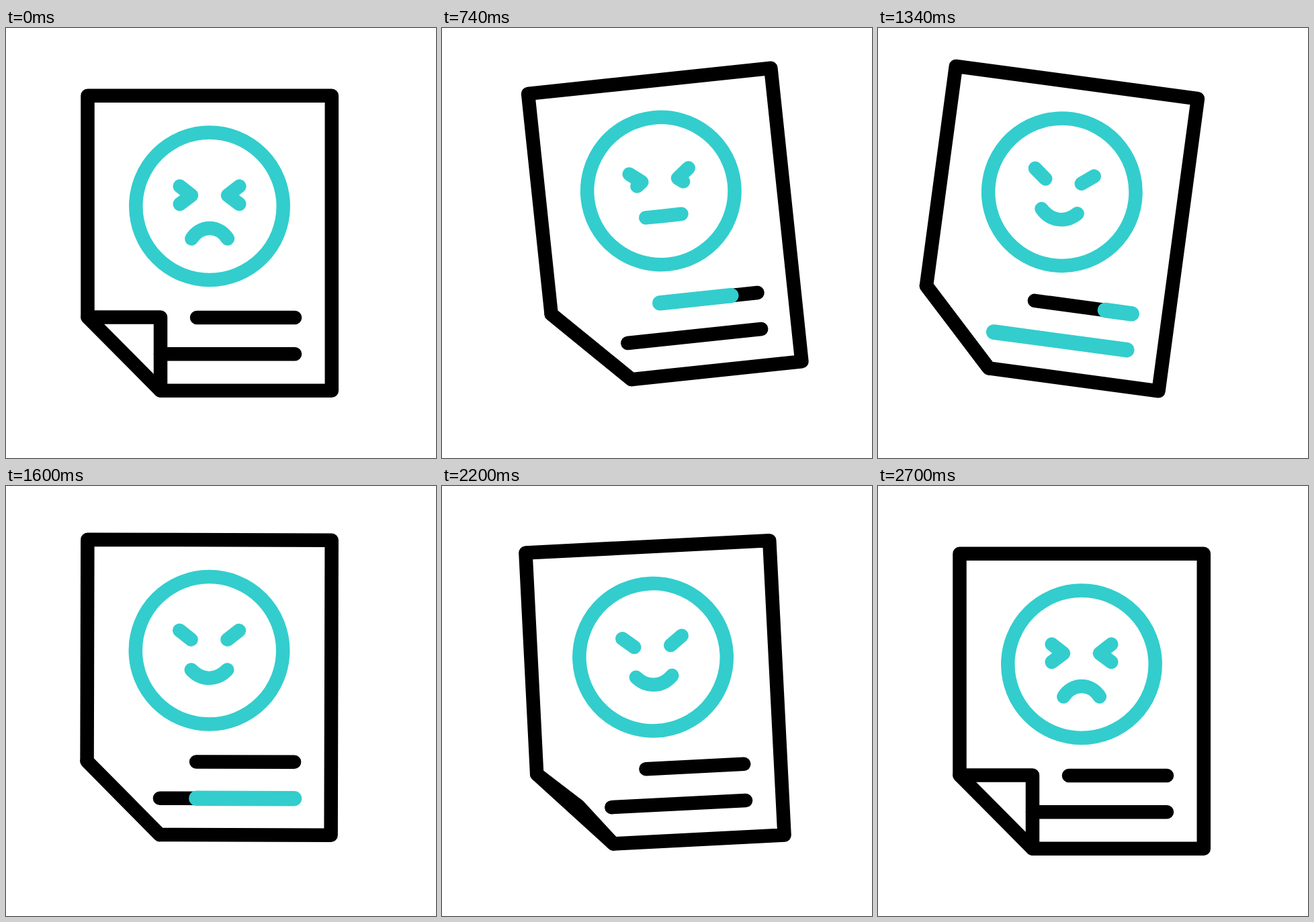
These frames come from a looping animation (640 px wide and 640 px high, 3.02 s). An HTML page:

```html
<!DOCTYPE html>
<html lang="en">
<head>
<meta charset="utf-8">
<title>Swinging page</title>
<style>
  html, body { margin: 0; width: 100%; height: 100%; overflow: hidden; background: #fff; }
  svg { display: block; width: 100%; height: 100%; }
  path, circle { fill: none; stroke: #000; stroke-width: 20.5; stroke-linecap: round; stroke-linejoin: round; }
  .teal > * { stroke: #33cdcd; }
  .sweep > * { stroke-width: 22.5; }
</style>
</head>
<body>
<svg viewBox="0 0 640 640">
  <g id="page">
    <path d="M284 431H430M230 485.3H430"/>
    <g class="teal sweep"><path id="sweep1"/><path id="sweep2"/></g>
    <path d="M121.5 430.5V100.7H484.8V539.7H230Z"/>
    <path id="flap"/>
    <g class="teal">
      <circle cx="303" cy="265.3" r="109.7"/>
      <path id="eyes"/>
      <path id="mouth"/>
    </g>
  </g>
</svg>
<script>
const LOOP = 3020, STEP = 20;
const $ = id => document.getElementById(id);
const mix = (a, b, k) => a + (b - a) * k;

// Smooth 0..1 ramp between two times
function ramp(t, from, to) {
  const k = Math.min(1, Math.max(0, (t - from) / (to - from)));
  return k * k * (3 - 2 * k);
}

function sweep(id, x1, x2, y, start, end) {
  $(id).setAttribute('d', end > start ? `M${mix(x1, x2, start)} ${y}H${mix(x1, x2, end)}` : '');
}

function draw(t) {
  const rise = ramp(t, 200, 715), fall = ramp(t, 1870, 2510);
  const swing = ramp(t, 715, 1285) - ramp(t, 1285, 1870);
  const angle = -6.1 * (rise - fall) + 14.1 * swing;
  const lift = -20.5 * (rise - fall);
  $('page').setAttribute('transform', `translate(0 ${lift}) rotate(${angle} 293 47)`);

  const open = rise - ramp(t, 2090, 2700);
  $('flap').setAttribute('d',
    `M121.5 430.5L${mix(230, 175.8, open)} ${mix(430.5, 485.1, open)}L230 539.7`);

  sweep('sweep1', 284, 430, 431, ramp(t, 850, 1597), ramp(t, 345, 945));
  sweep('sweep2', 230, 430, 485.3, ramp(t, 1365, 2050), ramp(t, 749, 1349));

  const grin = ramp(t, 480, 960) - ramp(t, 2215, 2700);
  const dx = 18 * (1 - grin), y = mix(262, 249, grin);
  $('eyes').setAttribute('d',
    `M258.7 235.5L276 249L${276 - dx * 0.96} ${y}M347.3 235.5L330 249L${330 + dx * 0.96} ${y}`);

  const endY = mix(313.5, 294, grin), bendY = mix(292.8, 310.5, grin);
  const bend = mix(14, 11.5, grin);
  $('mouth').setAttribute('d',
    `M276.3 ${endY}C${303 - bend} ${bendY} ${303 + bend} ${bendY} 329.9 ${endY}`);
}

function tick() {
  const t = performance.now() % LOOP;
  draw(Math.floor(t / STEP) * STEP);
  requestAnimationFrame(tick);
}
tick();
</script>
</body>
</html>
```
